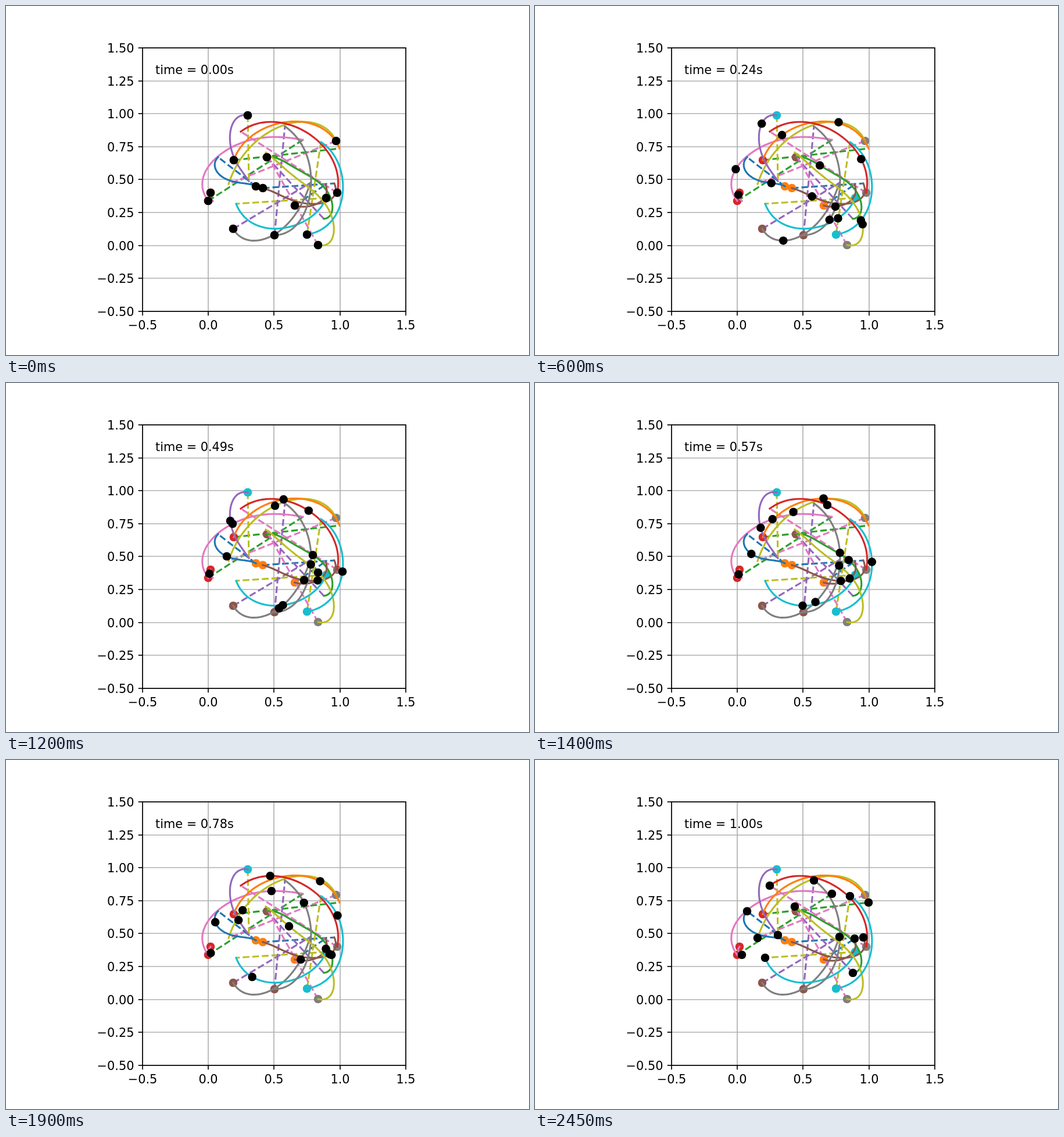
An HTML page with a canvas for the animation above (2.5 s loop, 900 by 600 pixels).

```html
<!DOCTYPE html>
<html lang="en">
<head>
<meta charset="utf-8">
<title>Trajectories</title>
<style>
html, body { margin: 0; width: 100%; height: 100%; overflow: hidden; background: #fff; }
canvas { display: block; }
</style>
</head>
<body>
<canvas id="stage" width="900" height="600"></canvas>
<script>
const STEPS = 50, STEP_MS = 50, LAST = STEPS - 1;
const PT = 150 / 72; // one point in pixels
const FONT = `${10 * PT}px "DejaVu Sans", sans-serif`;
const LEFT = 235, RIGHT = 688, TOP = 72, BOTTOM = 525, SIZE = RIGHT - LEFT;
const CYCLE = ['#1f77b4', '#ff7f0e', '#2ca02c', '#d62728', '#9467bd',
               '#8c564b', '#e377c2', '#7f7f7f', '#bcbd22', '#17becf'];

// Steps at which a coordinate's values are reached, by number of values.
const KNOTS = {
  2: [0, 49],
  3: [0, 24, 49],
  4: [0, 18, 32, 49],
  5: [0, 7, 24, 43, 49],
  6: [0, 7, 18, 32, 43, 49]
};

// Horizontal and vertical values that each agent passes through.
const PATHS = [
  [[442, 463, 513, 566, 565], [313, 321, 339, 324, 305]],
  [[348, 338, 390, 481, 511], [335, 302, 242, 226, 230]],
  [[391, 410, 470, 516, 524], [383, 399, 364, 304]],
  [[568, 545, 463, 394, 383], [232, 201, 235, 306]],
  [[551, 500, 445, 396], [330, 376, 381, 340]],
  [[430, 393, 366, 365], [310, 306, 298, 270, 260]],
  [[392, 450, 515, 574], [265, 208, 200, 245]],
  [[449, 474, 528, 561, 547], [260, 265, 285, 315, 353, 366]],
  [[570, 544, 484, 404], [321, 239, 203, 216]],
  [[416, 398, 386, 408, 418], [188, 192, 237, 287, 301]],
  [[497, 527, 546, 550], [343, 343, 332, 307]],
  [[352, 350, 356], [321, 335]],
  [[462, 519, 522, 480], [394, 384, 312, 226, 207]],
  [[537, 562, 537, 469, 447], [411, 398, 348, 303, 270, 252]],
  [[518, 573, 578, 542], [393, 348, 291, 234]]
];

// Polynomial through the values, evaluated at a step.
function interpolate(values, step) {
  const knots = KNOTS[values.length];
  return values.reduce((sum, value, i) => sum + knots.reduce(
    (term, knot, j) => j === i ? term : term * (step - knot) / (knots[i] - knot), value), 0);
}

const tracks = PATHS.map(path => Array.from({ length: STEPS },
  (_, step) => path.map(values => interpolate(values, step))));

function polyline(ctx, points, color, width) {
  ctx.strokeStyle = color;
  ctx.lineWidth = width;
  ctx.beginPath();
  points.forEach(([x, y]) => ctx.lineTo(x, y));
  ctx.stroke();
}

function dot(ctx, [x, y], color) {
  ctx.fillStyle = color;
  ctx.beginPath();
  ctx.arc(x, y, 3.5 * PT, 0, 2 * Math.PI);
  ctx.fill();
}

// Evenly spaced axis ticks from -0.5 to 1.5, as [pixel, value].
const ticks = (count, toPixel) => Array.from({ length: count }, (_, i) => {
  const part = i / (count - 1);
  return [Math.round(toPixel(part * SIZE)), 2 * part - 0.5];
});
const label = (value, digits) => value.toFixed(digits).replace('-', '\u2212');

function drawAxes(ctx) {
  const thin = 0.8 * PT, tick = 3.5 * PT;
  const xTicks = ticks(5, d => LEFT - 0.25 + d);
  const yTicks = ticks(9, d => BOTTOM - 0.1 - d);

  xTicks.forEach(([x]) => polyline(ctx, [[x, TOP], [x, BOTTOM]], '#b0b0b0', thin));
  yTicks.forEach(([y]) => polyline(ctx, [[LEFT, y], [RIGHT, y]], '#b0b0b0', thin));

  ctx.font = FONT;
  ctx.fillStyle = '#000';
  ctx.textAlign = 'center';
  xTicks.forEach(([x, value]) => {
    polyline(ctx, [[x, BOTTOM], [x, BOTTOM + tick]], '#000', thin);
    ctx.fillText(label(value, 1), x, BOTTOM + 31);
  });
  ctx.textAlign = 'right';
  yTicks.forEach(([y, value]) => {
    polyline(ctx, [[LEFT - tick, y], [LEFT, y]], '#000', thin);
    ctx.fillText(label(value, 2), LEFT - 2 * tick, y + 8);
  });
}

function drawTracks(ctx) {
  const width = 1.5 * PT;
  tracks.forEach((track, i) => {
    ctx.setLineDash([3.7 * width, 1.6 * width]);
    polyline(ctx, [track[0], track[LAST]], CYCLE[2 * i % 10], width);
    ctx.setLineDash([]);
    dot(ctx, track[0], CYCLE[(2 * i + 1) % 10]);
  });
  ctx.lineCap = 'square';
  ctx.lineJoin = 'round';
  tracks.forEach((track, i) => polyline(ctx, track, CYCLE[(i + 5) % 10], width));
}

function drawBorder(ctx) {
  ctx.strokeStyle = '#000';
  ctx.lineWidth = 0.8 * PT;
  ctx.lineJoin = 'miter';
  ctx.strokeRect(LEFT, TOP, SIZE, BOTTOM - TOP);
}

const stageCanvas = document.getElementById('stage');
const stage = stageCanvas.getContext('2d');
const backdrop = stageCanvas.cloneNode();
const back = backdrop.getContext('2d');
back.fillStyle = '#fff';
back.fillRect(0, 0, backdrop.width, backdrop.height);
drawAxes(back);
drawTracks(back);
drawBorder(back);

const start = performance.now();

function render() {
  const step = Math.floor((performance.now() - start) / STEP_MS) % STEPS;
  stage.drawImage(backdrop, 0, 0);
  tracks.forEach(track => dot(stage, track[step], '#000'));
  stage.font = FONT;
  stage.fillStyle = '#000';
  stage.fillText(`time = ${(step / LAST).toFixed(2)}s`, 257, 117);
  requestAnimationFrame(render);
}
render();
</script>
</body>
</html>
```
